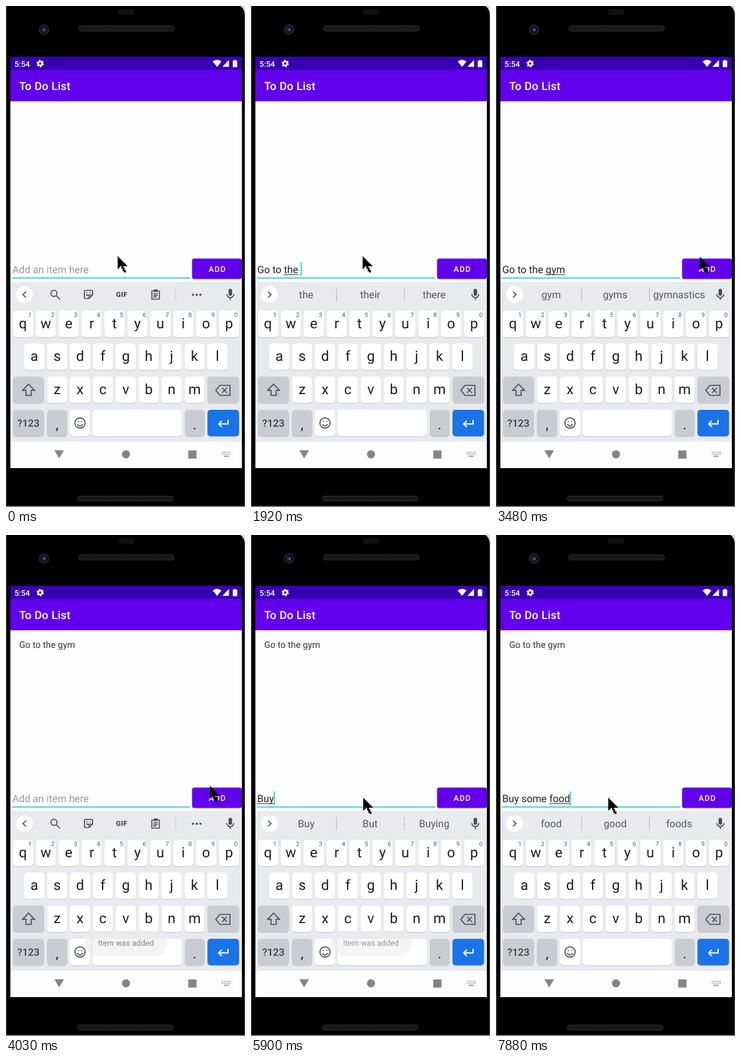
Write an HTML page that moves like this. It is 381x799 px and loops after 8 s.

```html
<!DOCTYPE html>
<html lang="en">
<head>
<meta charset="utf-8">
<title>To Do List</title>
<style>
  html, body { margin: 0; width: 100%; height: 100%; overflow: hidden; background: #000; }
  svg { display: block; width: 381px; height: 799px; }
  text { font-family: Roboto, sans-serif; white-space: pre; text-rendering: geometricPrecision; }
  .mid { text-anchor: middle; }
  .line { fill: none; stroke: #4a4d51; stroke-width: 1.7; }
  .word { font-size: 16.16px; fill: #55585c; }
</style>
</head>
<body>
<svg viewBox="0 0 381 799">
  <defs>
    <pattern id="mesh" width="3" height="4" patternUnits="userSpaceOnUse">
      <rect width="3" height="4" fill="#101010"/>
      <path d="M0 .5h1.5M1.5 2.5H3" stroke="#303030"/>
    </pattern>
  </defs>

  <!-- phone body -->
  <rect width="381" height="799"/>
  <path d="M.5 0V797.5H380.5V0" fill="none" stroke="#4d4d4d"/>
  <path d="M0 798.5H381" stroke="#8a8a8a"/>
  <path d="M374 0Q379.5 4 381 13V0Z" fill="#ddd"/>
  <rect x="178" y="5" width="27" height="9" rx="4.5" fill="#101010"/>
  <g fill="url(#mesh)" stroke="#2b2b2b">
    <rect x="115.5" y="31.5" width="153" height="8.5" rx="4"/>
    <rect x="113.5" y="781.5" width="153" height="8" rx="4"/>
  </g>
  <circle cx="60.5" cy="37.5" r="7.5" fill="#121318" stroke="#29292c" stroke-width="1.6"/>
  <circle cx="60.5" cy="37.5" r="3.4" fill="#1f2c60"/>
  <circle cx="61.5" cy="38" r="1.3" fill="#6475bd"/>

  <!-- app -->
  <rect x="7" y="81" width="369" height="656" fill="#fefefe"/>
  <rect x="7" y="81" width="369" height="21" fill="#3700b3"/>
  <rect x="7" y="102" width="369" height="50" fill="#6200ee"/>
  <g fill="#fff">
    <text x="13.5" y="96.5" font-size="12.57" font-weight="500">5:54</text>
    <circle cx="54.5" cy="91.8" r="3.2" fill="none" stroke="#fff" stroke-width="2.5"/>
    <circle cx="54.5" cy="91.8" r="4.9" fill="none" stroke="#fff" stroke-width="2" stroke-dasharray="2.6 2.53"/>
    <path d="M329.5 88.5Q336.500 83 343.5 88.5L336.5 97ZM345 97L355.5 86V97Z"/>
    <path d="M361.5 87.2H363.5V86H366.5V87.2H368.5V97.5H361.5Z"/>
    <text x="21" y="134.3" font-size="17.96" font-weight="500" letter-spacing=".2245">To Do List</text>
  </g>
  <text id="item" x="21" y="179.5" font-size="14.37" fill="#333">Go to the gym</text>

  <text id="hint" x="10" y="426.2" font-size="16.16" fill="#999">Add an item here</text>
  <text id="input" x="10" y="426.2" font-size="16.16" fill="#222"></text>
  <rect id="underline" y="428" height="1" fill="#333"/>
  <rect id="caret" y="409" width="1.6" height="22" fill="#03dac5"/>
  <rect x="10" y="433" width="283.5" height="1.5" fill="#16c6b6"/>

  <rect x="296.5" y="403.5" width="80" height="33" rx="4" fill="#000" opacity=".2"/>
  <rect x="296.7" y="402.7" width="79.3" height="32.5" rx="3.5" fill="#6200ee"/>
  <rect id="press" x="296.7" y="402.7" width="79.3" height="32.5" rx="3.5" fill="#fff" opacity=".24"/>
  <text class="mid" x="337" y="423.6" font-size="12.57" font-weight="500" letter-spacing="1.12" fill="#fff">ADD</text>

  <!-- keyboard -->
  <rect x="7" y="440" width="369" height="255" fill="#e8eaed"/>
  <circle cx="29.5" cy="460.3" r="13.5" fill="#fff"/>
  <path id="chevron" class="line"/>
  <g fill="#4a4d51">
    <rect x="354.8" y="451" width="5.6" height="11" rx="2.8"/>
    <path class="line" d="M352 459.5a5.6 5.6 0 0 0 11.2 0M357.6 465V469"/>
  </g>
  <g id="tools">
    <circle class="line" cx="76.5" cy="458.3" r="4.9"/>
    <path class="line" d="M80 462L86 468"/>
    <path class="line" d="M127 453.5H136Q138 453.5 138 455.5V461L132.5 466.5H127Q125 466.5 125 464.5V455.5Q125 453.5 127 453.5ZM138 461H134.5Q132.5 461 132.5 463V466.5M128 460Q130 463 132 460.5M128.5 457.3h1.6M133 457.3h1.6"/>
    <text class="mid" x="184.3" y="464.3" font-size="11.2" font-weight="900" fill="#4a4d51" letter-spacing=".4">GIF</text>
    <path class="line" d="M232.500 454.5H244.5V467.5H232.5ZM235 458.5H242M235 461.3H242M235 464.1H240"/>
    <rect x="235.5" y="452" width="6" height="4" rx="1" fill="#4a4d51"/>
    <path d="M270.5 451V470" stroke="#c8cbd0"/>
    <g fill="#4a4d51"><circle cx="298" cy="460.5" r="1.8"/><circle cx="304" cy="460.5" r="1.8"/><circle cx="310" cy="460.5" r="1.8"/></g>
  </g>
  <g id="words">
    <path d="M136.5 450V471M244.5 450V471" stroke="#b5b8bd"/>
    <text class="mid word" x="88" y="466.3"></text>
    <text class="mid word" x="190" y="466.3"></text>
    <text class="mid word" x="292" y="466.3"></text>
  </g>
  <g id="keys"></g>
  <path class="line" d="M36 603L45.5 612.8H40.2V621H31.8V612.8H26.5Z"/>
  <path class="line" d="M341 605H357V621H341L334.5 613ZM344.5 609L352 617M352 609L344.5 617"/>
  <circle class="line" cx="118" cy="665" r="8.2"/>
  <path class="line" d="M113.5 667Q118 673 122.5 667M114.2 662.5h2M119.8 662.5h2"/>
  <path d="M354 660V666.5H339.5M344 661.5L339 666.5L344 671.5" fill="none" stroke="#fff" stroke-width="2"/>

  <!-- navigation bar -->
  <g fill="#858585">
    <path d="M77 708.5H92.5L84.7 721.5Z"/>
    <circle cx="191.3" cy="715" r="6.5"/>
    <rect x="290.5" y="708.8" width="13.2" height="13"/>
    <path d="M344 711.7H358M344 714.7H358" stroke="#858585" stroke-width="1.6" stroke-dasharray="1.6 1.5"/>
    <path d="M347 718H355" stroke="#858585" stroke-width="1.5"/>
  </g>

  <g id="toast">
    <rect x="126" y="630.5" width="131" height="41" rx="20.5" fill="#ededed"/>
    <text class="mid" x="191.3" y="655" font-size="12.57" fill="#333">Item was added</text>
  </g>
  <path id="mouse" d="M0 0V20H2V18H4V16H6V20H8V24H10V26H13V22H11V18H9V16H15V14H13V12H11V10H9V8H7V6H5V4H3V2H1V0Z" shape-rendering="crispEdges"/>
</svg>

<script>
const LOOP = 8000;
const $ = id => document.getElementById(id);

function add(parent, name, attrs, content = '') {
  const node = document.createElementNS('http://www.w3.org/2000/svg', name);
  for (const key in attrs) node.setAttribute(key, attrs[key]);
  node.textContent = content;
  parent.append(node);
}

function addKey(x, y, width, fill = '#fff', label = '', drop = 28, font = { 'font-size': 22.5, fill: '#1b1c1e' }) {
  const box = { x, width, height: 42.3, rx: 5 };
  add($('keys'), 'rect', { ...box, y: y + 1, fill: '#bfc2c7' });
  add($('keys'), 'rect', { ...box, y, fill });
  add($('keys'), 'text', { class: 'mid', x: x + width / 2, y: y + drop, ...font }, label);
}

const PITCH = 36.5, GREY = '#c9ccd1';
[['qwertyuiop', 11, 486], ['asdfghjkl', 29, 538.3], ['zxcvbnm', 65.5, 591]].forEach(([letters, left, y]) =>
  [...letters].forEach((letter, i) => addKey(left + i * PITCH, y, 32, '#fff', letter)));
for (let i = 0; i < 10; i++)
  add($('keys'), 'text', { class: 'mid', x: 38 + i * PITCH, y: 496.3, 'font-size': 9.8, fill: '#55585c' }, (i + 1) % 10);
addKey(11, 591, 49.5, GREY);
addKey(321.2, 591, 50.3, GREY);
addKey(11, 644, 49.5, GREY, '?123', 26.8, { 'font-size': 16.16, 'font-weight': 500, fill: '#3c4043' });
addKey(65.5, 644, 32, GREY, ',', 31);
addKey(102, 644, 32);
addKey(138, 644, 142);
addKey(285, 644, 31.5, GREY, '.', 31);
addKey(321.2, 644, 50.3, '#1a73e8');

// Each step lists what changes; underscores enclose the underlined word.
const START = { text: '', words: '', caret: false, mouse: [178, 399], item: false, toast: 0, press: false };
const STEPS = [
  [150, { text: 'G', caret: true }],
  [270, { text: 'Go' }],
  [550, { text: '_Go_' }],
  [930, { words: 'Go Good Got' }],
  [1050, { text: '_Go_ ' }],
  [1200, { text: 'Go _t_' }],
  [1320, { text: 'Go _to_' }],
  [1440, { words: 'to too tonight' }],
  [1560, { text: 'Go to ' }],
  [1680, { text: 'Go to _t_' }],
  [1800, { text: 'Go to _th_', words: 'the their there' }],
  [1920, { text: 'Go to _the_ ' }],
  [2040, { text: 'Go to the ' }],
  [2190, { words: 'same next store' }],
  [2470, { text: 'Go to the _g_' }],
  [2590, { text: 'Go to the _gy_' }],
  [2840, { text: 'Go to the _gym_', words: 'gym gyms gymnastics' }],
  [3210, { mouse: [222, 386] }],
  [3330, { mouse: [304, 382], caret: false }],
  [3480, { mouse: [325, 400] }],
  [3760, { press: true }],
  [3880, { text: '', words: '', item: true }],
  [4010, { press: false, toast: .6 }],
  [4130, { toast: 1 }],
  [4280, { mouse: [290, 405] }],
  [4560, { mouse: [205, 416] }],
  [4700, { mouse: [179, 419] }],
  [4820, { text: 'B', caret: true }],
  [5070, { text: '_Bu_', words: 'Bu But Buy' }],
  [5650, { text: '_Buy_' }],
  [5770, { words: 'Buy But Buying' }],
  [5890, { toast: .5 }],
  [6010, { text: 'Buy ', toast: 0 }],
  [6140, { words: 'a the some' }],
  [6280, { text: 'Buy _s_' }],
  [6560, { words: 's a some' }],
  [6680, { text: 'Buy _so_' }],
  [6800, { text: 'Buy _som_' }],
  [6930, { text: 'Buy _some_', words: 'some done something' }],
  [7090, { text: 'Buy some ' }],
  [7370, { text: 'Buy some _f_' }],
  [7490, { text: 'Buy some _fo_', words: 'for from food' }],
  [7640, { text: 'Buy some _foo_' }],
  [7760, { words: 'food foot football' }],
  [7880, { text: 'Buy some _food_', words: 'food good foods' }]
];

const show = (id, visible) => $(id).setAttribute('visibility', visible ? 'visible' : 'hidden');
const input = $('input');
const widthOf = text => {
  input.textContent = text;
  return text ? input.getComputedTextLength() : 0;
};

function render(time) {
  const state = Object.assign({}, START, ...STEPS.filter(([at]) => at <= time).map(step => step[1]));
  const [before, marked = ''] = state.text.split('_');

  $('underline').setAttribute('x', 10 + widthOf(before));
  $('underline').setAttribute('width', widthOf(marked));
  $('caret').setAttribute('x', 9.8 + widthOf(state.text.replaceAll('_', '')));
  show('caret', state.caret);
  show('hint', !state.text);
  show('item', state.item);
  show('press', state.press);
  $('toast').setAttribute('opacity', state.toast);

  show('tools', !state.words);
  show('words', state.words);
  const words = state.words.split(' ');
  document.querySelectorAll('.word').forEach((node, i) => node.textContent = words[i] || '');
  $('chevron').setAttribute('d', state.words ? 'M27 455.5L32 460.3L27 465' : 'M32 455.5L27 460.3L32 465');
  $('mouse').setAttribute('transform', `translate(${state.mouse})`);
}

const start = performance.now();
function tick() {
  render((performance.now() - start) % LOOP);
  requestAnimationFrame(tick);
}
tick();
</script>
</body>
</html>
```
